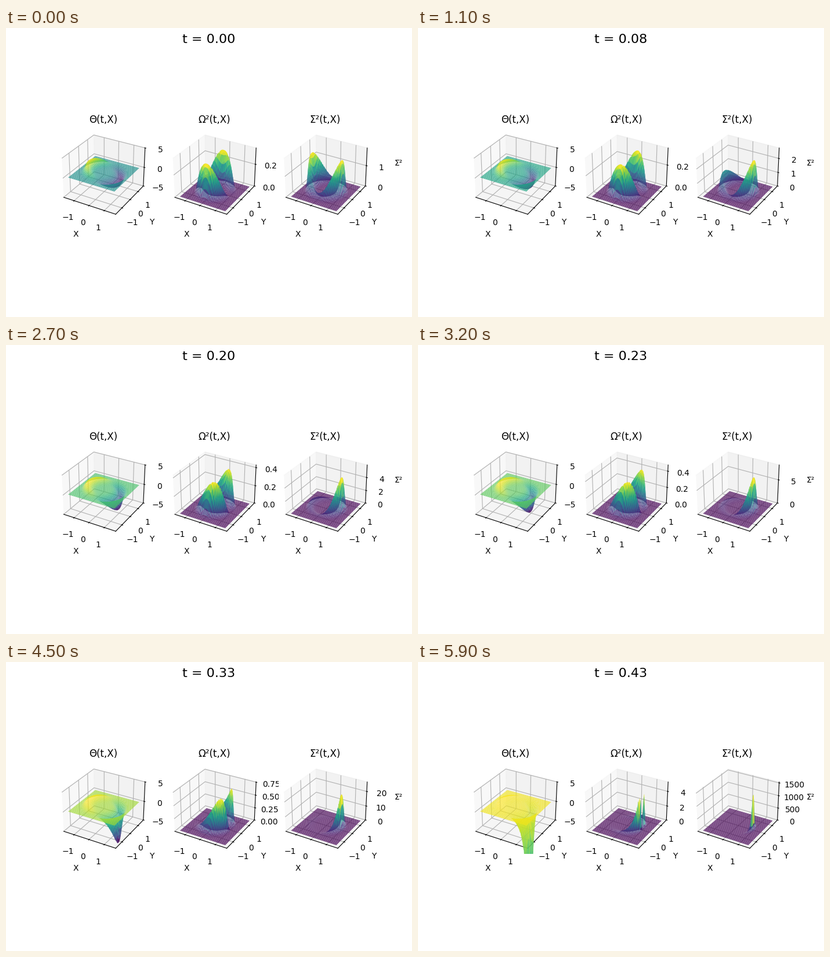
A matplotlib script that plays this animation: 700x500 px, repeating every 6000 ms.

```python
import numpy as np
import matplotlib.pyplot as plt
from matplotlib.animation import FuncAnimation
from mpl_toolkits.mplot3d.art3d import Poly3DCollection

FRAMES = 60
T_END = 0.4317
HALF = 1.5
STEPS = 50

# Grid of 2x2-cell patches, each outlined by its eight border nodes
axis = np.linspace(-HALF, HALF, 2 * STEPS + 1)
X, Y = np.meshgrid(axis, axis)
base = np.arange(0, 2 * STEPS, 2)
border = np.array([(0, 0), (0, 1), (0, 2), (1, 2), (2, 2), (2, 1), (2, 0), (1, 0)])
rows, cols = np.meshgrid(base, base, indexing="ij")
ROWS = rows.reshape(-1, 1) + border[:, 0]
COLS = cols.reshape(-1, 1) + border[:, 1]

# Initial velocity exp(-r^6) along X and its gradient
r2 = X**2 + Y**2
slope = -6 * r2**2 * np.exp(-r2**3)
FX, FY = slope * X, slope * Y


def fields(t):
    """Expansion, vorticity and shear of freely moving matter."""
    stretch = 1 + t * FX
    theta = FX / stretch
    omega2 = (FY / stretch) ** 2 / 16
    sigma2 = theta**2 / 3 + omega2
    return theta, omega2, sigma2


def patches(z):
    return np.stack([X[ROWS, COLS], Y[ROWS, COLS], z[ROWS, COLS]], axis=-1)


fig = plt.figure(figsize=(7, 5), dpi=100)
heading = fig.suptitle("", fontsize=16)
axes, surfaces = [], []
for k, (name, z) in enumerate(zip(("Θ", "Ω²", "Σ²"), fields(0))):
    ax = fig.add_subplot(1, 3, k + 1, projection="3d")
    surface = Poly3DCollection(patches(z), cmap="viridis", alpha=0.8, linewidth=0)
    ax.add_collection3d(surface)
    ax.set_xlim(-1.1 * HALF, 1.1 * HALF, view_margin=1 / 48)
    ax.set_ylim(-1.1 * HALF, 1.1 * HALF, view_margin=1 / 48)
    ax.set_title(f"{name}(t,X)")
    ax.set_xlabel("X")
    ax.set_ylabel("Y")
    ax.set_zlabel(name)
    axes.append(ax)
    surfaces.append(surface)
axes[0].set_zlim(-5, 5)


def update(i):
    t = T_END * i / (FRAMES - 1)
    heading.set_text(f"t = {t:.2f}")
    for k, z in enumerate(fields(t)):
        faces = patches(z)
        surfaces[k].set_verts(faces)
        surfaces[k].set_array(faces[:, :, 2].mean(axis=1))
        surfaces[k].autoscale()
        if k > 0:
            axes[k].set_zlim(0, 1.1 * z.max())
    return [heading, *surfaces]


anim = FuncAnimation(fig, update, frames=FRAMES, interval=100, repeat=True)
plt.show()
```
